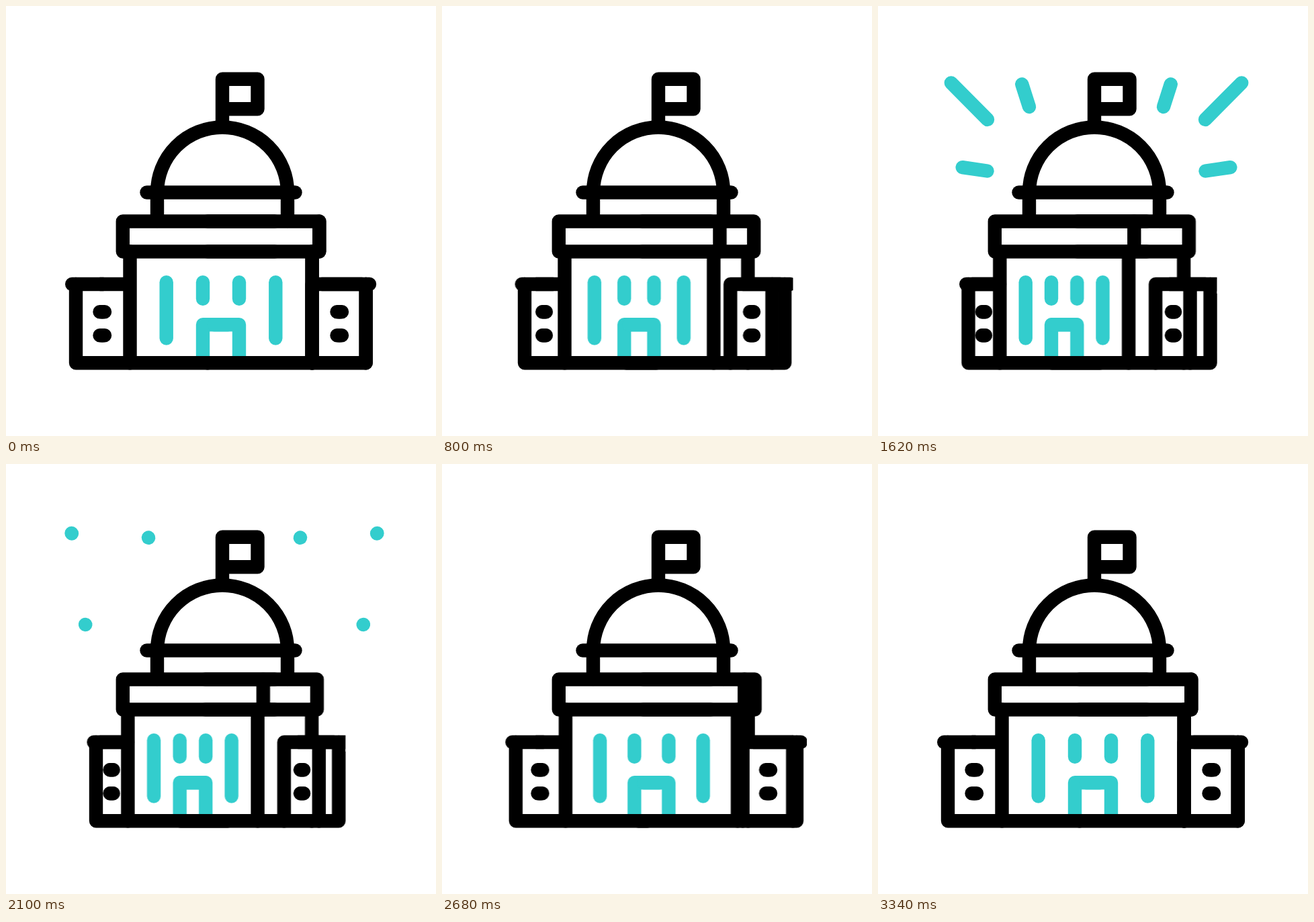
An HTML page that plays this animation: 640x640 px, repeating every 3.6 s.

```html
<!DOCTYPE html>
<html lang="en">
<head>
<meta charset="utf-8">
<title>Domed building</title>
<style>
  @property --from { syntax: "<length>"; inherits: true; initial-value: 0px; }
  @property --to { syntax: "<length>"; inherits: true; initial-value: 0px; }

  html, body { margin: 0; width: 100%; height: 100%; overflow: hidden; background: #fff; }
  svg { display: block; width: 100%; height: 100%; }

  .ink, .teal {
    fill: none;
    stroke: #000;
    stroke-width: 20.4;
    stroke-linecap: round;
    stroke-linejoin: round;
  }
  .teal { stroke: #33cdcd; }
  .paper { fill: #fff; stroke: none; }

  /* each moving part slides by its own --d as the building turns */
  [style] { animation: turn 3600ms infinite; }
  @keyframes turn {
    0% { transform: translateX(0); }
    3.333% { transform: translateX(0); animation-timing-function: cubic-bezier(.75, 0, .25, 1); }
    38.889% { transform: translateX(var(--d)); }
    52.778% { transform: translateX(var(--d)); animation-timing-function: cubic-bezier(.75, 0, .25, 1); }
    88.333%, 100% { transform: translateX(0); }
  }

  .rays {
    animation: grow 3600ms infinite, leave 3600ms infinite, show 3600ms step-end infinite;
  }
  .rays path {
    stroke-dasharray: calc(var(--to) - var(--from)) 900px;
    stroke-dashoffset: calc(-1 * var(--from));
  }
  @keyframes grow {
    0% { --to: 0px; }
    33.333% { --to: 0px; animation-timing-function: cubic-bezier(.333, .667, .667, 1); }
    53.333%, 100% { --to: 100px; }
  }
  @keyframes leave {
    0% { --from: 0px; }
    45.556% { --from: 0px; animation-timing-function: cubic-bezier(.4, 0, .5, 1); }
    58.889%, 100% { --from: 99.5px; }
  }
  @keyframes show {
    0% { visibility: hidden; }
    33.333% { visibility: visible; }
    59.722%, 100% { visibility: hidden; }
  }
</style>
</head>
<body>
<svg viewBox="0 0 640 640">
  <g class="teal rays">
    <g id="fan">
      <path pathLength="100" d="M163 169L97.5 103"/>
      <path pathLength="100" d="M225 150L212 109.5"/>
      <path pathLength="100" d="M162.500 245.500L118 239"/>
    </g>
    <use href="#fan" transform="matrix(-1 0 0 1 650 0)"/>
  </g>

  <!-- columns and door -->
  <g class="teal">
    <path style="--d:-19px" d="M238.700 411.300V494.500"/>
    <path style="--d:-35px" d="M293 411.300V435.700"/>
    <path style="--d:-50.700px" d="M347 411.300V435.700"/>
    <path style="--d:-66.800px" d="M401.300 411.300V494.500"/>
    <path style="--d:-35px" d="M293 525V474.300H330"/>
    <path style="--d:-50.700px" d="M347 525V474.300H310"/>
  </g>

  <g class="ink">
    <!-- back wall -->
    <path style="--d:-.500px" d="M455.600 365.500V531.200"/>

    <!-- right wing -->
    <rect class="paper" style="--d:-42.500px" x="455.600" y="414" width="80" height="117"/>
    <path style="--d:-42.500px" d="M455.600 531.200V414H530"/>
    <path style="--d:-36px" d="M470 414H541"/>
    <path style="--d:-71.200px" d="M535.700 414V531.200"/>
    <path style="--d:-41.200px" d="M300 531.200H535.700V414"/>
    <g id="panes">
      <path style="--d:-55.500px" d="M492.500 455.200h4.500m-4.500 35h4.500"/>
      <path style="--d:-58px" d="M495.500 455.200h4.500m-4.500 35h4.500"/>
    </g>
    <rect class="paper" style="--d:-47.500px" x="552" y="400" width="60" height="28"/>

    <!-- left wing -->
    <path style="--d:33px" d="M98.200 414H145"/>
    <path d="M140 414H181"/>
    <path style="--d:30.500px" d="M104 414V531.200H300"/>
    <path style="--d:15.600px" d="M139.500 455.200h4.500m-4.500 35h4.500"/>
    <path style="--d:12.600px" d="M142.500 455.200h4.500m-4.500 35h4.500"/>

    <!-- front walls -->
    <path style="--d:-3.200px" d="M184.500 365.500V531.200"/>
    <path style="--d:-82.500px" d="M455.600 365.500V531.200"/>

    <!-- cornice -->
    <path d="M400 320.500H173.800V365.500H400"/>
    <path style="--d:-3.500px" d="M300 320.500H466.300V365.500H300"/>
    <path style="--d:-85px" d="M466.300 320.500V365.500"/>

    <!-- dome and flag -->
    <path d="M225 320V277.500A97 97 0 0 1 419 277.500V320"/>
    <path d="M209.500 277.500H430.500"/>
    <path d="M322 180V108.700H374.500V153.200H322"/>
  </g>
</svg>
</body>
</html>
```
